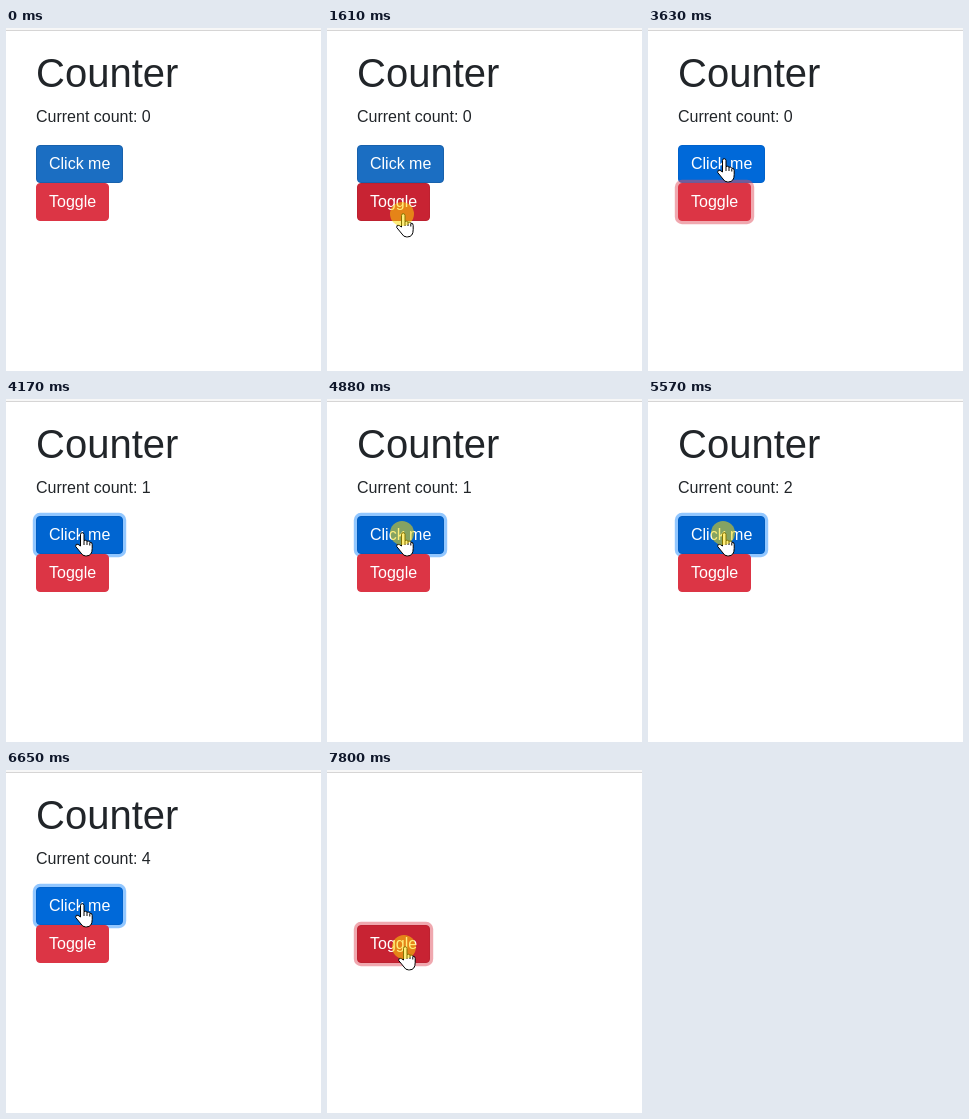
An HTML page that plays this animation: 315x343 px, repeating every 8 s.

```html
<!DOCTYPE html>
<html lang="en">
<head>
<meta charset="utf-8">
<title>Counter</title>
<style>
  html, body { margin: 0; width: 100%; height: 100%; overflow: hidden; background: #fff; }
  body { position: relative; color: #212529; font: 16px/24px "Liberation Sans", Arial, sans-serif; }
  body > *, #counter > * { position: absolute; margin: 0; white-space: nowrap; }
  #bar { top: 0; left: 0; right: 0; height: 2px; background: #f7f7f7; border-bottom: 1px solid #d6d5d5; }
  #counter { left: 30px; top: 0; }
  h1 { top: 21px; font-size: 40px; line-height: 48px; font-weight: 500; }
  p { top: 77px; }
  .btn { padding: 6px 12px; border: 1px solid; border-radius: 4px; color: #fff; }
  #add { top: 117px; }
  #toggle { left: 30px; top: 155px; }
  svg { left: 0; top: 0; overflow: visible; }
</style>
</head>
<body>
<div id="bar"></div>
<div id="counter">
  <h1>Counter</h1>
  <p>Current count: <span id="count">0</span></p>
  <div class="btn" id="add">Click me</div>
</div>
<div class="btn" id="toggle">Toggle</div>
<svg width="315" height="343">
  <g id="cursor" fill="#fff" stroke="#000" stroke-linejoin="round">
    <path id="arrow" d="M.5 .5V16.5L4.2 13L6.8 18.5L9 17.5L6.5 12H11.5Z"/>
    <path id="hand" d="M-.5 13V1.5Q-.5-.3 1.2-.3T3 1.5V7.5Q5 6.6 6 8.2Q8 7.4 8.8 9.2Q11.2 8.8 11.2 11.5V15.5Q11.2 22.9 5.5 22.9H4.5Q1.5 22.9 0 20L-5.3 13.5Q-5.6 10.4-3 11.3ZM3 7.5V12M6 8.2V12M8.8 9.5V12.5"/>
  </g>
  <circle id="spot" r="12" fill="rgb(255,222,0)" fill-opacity=".52"/>
</svg>
<script>
const LOOP = 8000, RELEASE = 235, FADE = 150;
const $ = id => document.getElementById(id);

const addPresses = [3870, 4650, 5410, 6270];
const togglePresses = [1610, 2690, 7110, 7800];
const presses = [...addPresses, ...togglePresses];

// Pointer moves: first step, last step, number of steps, destination
const start = [247, 346];
const moves = [
  [210, 680, 7, [139, 268]],
  [910, 1370, 7, [75, 186]],
  [3230, 3390, 3, [75, 125]],
  [3630, 3700, 2, [75, 134]],
  [6730, 6880, 3, [77, 177]],
];

const buttons = [
  {
    el: $("add"),
    fill: [[27, 110, 194], [0, 105, 217], [0, 98, 204]],
    edge: [[24, 97, 172], [0, 98, 204], [0, 92, 191]],
    ring: "38,143,255",
    hover: [[3230, 6730]],
    active: addPresses.map(t => [t, t + RELEASE]),
    focus: [[3870, 7110]],
  },
  {
    el: $("toggle"),
    fill: [[220, 53, 69], [200, 35, 51], [200, 35, 51]],
    edge: [[220, 53, 69], [189, 33, 48], [189, 33, 48]],
    ring: "225,83,97",
    hover: [[1220, 3230], [6730, LOOP]],
    active: [],
    focus: [[1610, 3870], [7110, LOOP]],
  },
];

function ramp(t, from) {
  const p = Math.min(1, Math.max(0, (t - from) / FADE));
  return p * p * (3 - 2 * p);
}
const level = (t, spans) => spans.reduce((sum, [on, off]) => sum + ramp(t, on) - ramp(t, off), 0);
const lerp = (a, b, p) => a.map((v, i) => v + (b[i] - v) * p);
const held = t => presses.some(at => t >= at && t < at + RELEASE);

function pointer(t) {
  let pos = start;
  for (const [from, to, steps, target] of moves) {
    if (t < from) break;
    const step = Math.min(steps, Math.floor((t - from) / (to - from) * (steps - 1) + 0.1) + 1);
    pos = lerp(pos, target, 1 - (1 - step / steps) ** 1.5);
  }
  return pos;
}

function paintButton(t, { el, fill, edge, ring, hover, active, focus }) {
  const over = level(t, hover), down = level(t, active);
  const shade = ([base, hot, pressed]) => `rgb(${lerp(lerp(base, hot, over), pressed, down)})`;
  const glow = level(t, focus);
  el.style.backgroundColor = shade(fill);
  el.style.borderColor = shade(edge);
  el.style.boxShadow = `0 0 0 ${3.2 * glow}px rgba(${ring},${0.5 * glow})`;
}

function draw(t) {
  buttons.forEach(button => paintButton(t, button));

  const hidden = (t >= 1770 && t < 2850) || t >= 7270;
  $("counter").style.visibility = hidden ? "hidden" : "visible";
  $("count").textContent = addPresses.filter(at => t >= at + RELEASE).length;

  const [x, y] = pointer(t);
  const onButton = x < 117 && y >= 117 && y < 193;
  $("cursor").setAttribute("transform", `translate(${Math.round(x)} ${Math.round(y)})`);
  $("cursor").style.display = t < moves[0][0] ? "none" : "";
  $("hand").style.display = onButton ? "" : "none";
  $("arrow").style.display = onButton ? "none" : "";

  $("spot").setAttribute("cx", x);
  $("spot").setAttribute("cy", y);
  $("spot").style.display = held(t) ? "" : "none";
}

const began = performance.now();
function frame() {
  draw((performance.now() - began) % LOOP);
  requestAnimationFrame(frame);
}
frame();
</script>
</body>
</html>
```
